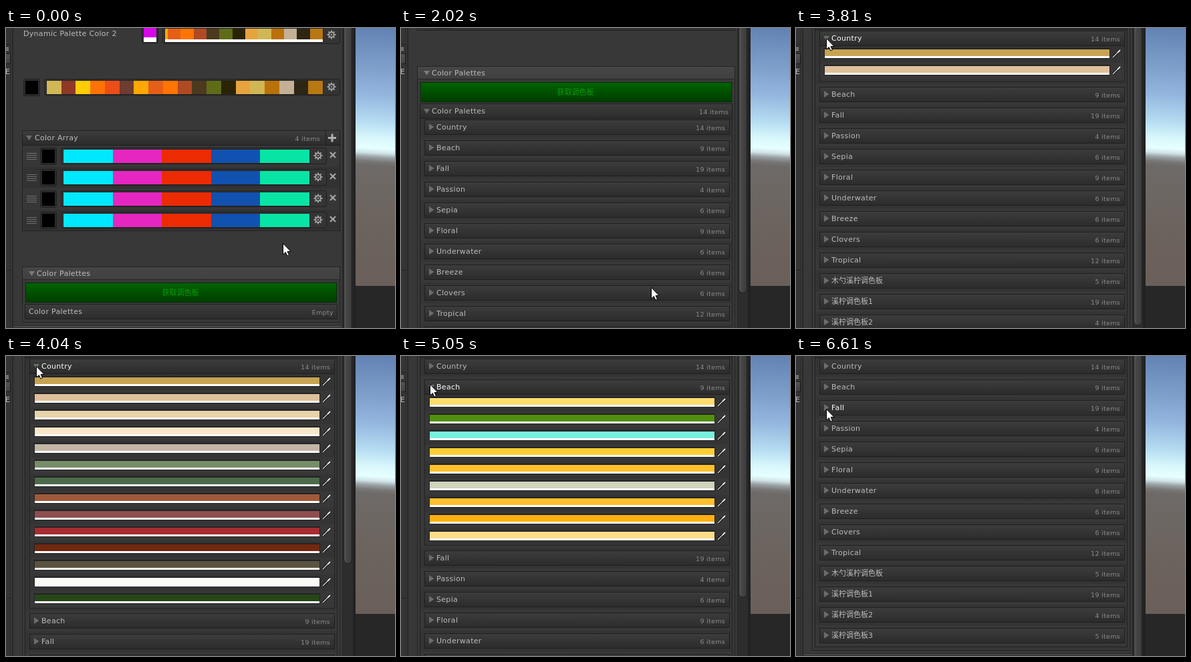
Write an HTML page with a canvas that moves like this. It is 582 by 449 pixels and loops after 7540 ms.

```html
<!DOCTYPE html>
<html lang="zh">
<head>
<meta charset="utf-8">
<style>
html, body { margin: 0; width: 582px; height: 449px; overflow: hidden; background: #383838; }
canvas { display: block; }
</style>
</head>
<body>
<canvas id="stage" width="582" height="449"></canvas>
<script>
const ctx = document.getElementById('stage').getContext('2d');
const LOOP = 7540, LIST_H = 433, ROW = 25;
const FONT = '"DejaVu Sans", "Noto Sans CJK SC", "Noto Sans CJK", sans-serif';
const colors = s => s.split(' ').map(c => '#' + c);

const autumn = colors('d0b856 8f3826 ffcd07 ff7204 ec4e18 6e3c31 ffa703 e55f16 ff7403 b04a23 4b3a1e 606b18 2a2405 e7a33e d1b753 bb710a c3b095 2e2614 b87812');
const bright = colors('00e8fd e626c0 ed2b03 1151b0 08e4a4');
const country = colors('c7a353 dfc09b e8d4a9 f8e7c8 c3b6a6 768d6a 4d6b4a a05a3a 8e4e4e a82c33 732810 5c5340 fbfbf6 274617');
const beach = colors('ffdd6d 51900c 78f0de ffcf33 ffc02c cdd5bb ffbf2c ffb010 ffdc88');

// Stepped timelines: [time, value...], each value holds until the next entry
const listKeys = [[0, 0], [1240, .6], [1320, 1]];
const scrollKeys = [[0, 0], [1720, 60], [1800, 120], [1870, 180], [1940, 240], [2020, 300], [2420, 375], [2490, 433]];
const pressKeys = [[0, 0], [1090, 1], [1240, 0]];
const cursorKeys = [[0, 415, 322], [300, 411, 352], [390, 408, 377], [540, 404, 381], [620, 397, 389],
  [700, 391, 395], [780, 388, 396], [1870, 381, 392], [2020, 375, 388], [2720, 366, 380], [2800, 354, 368], [2880, 347, 360]];
for (let i = 1; i <= 10; i++) {
  const p = i / 10, e = p * p * (3 - 2 * p);
  cursorKeys.push([3030 + (i - 1) * 77.7, 347 - 300 * e, 360 - 342 * e]);
}
cursorKeys.push([3810, 46, 15], [4590, 45, 24], [4670, 44, 35], [4740, 44, 42],
  [5580, 44, 50], [5630, 45, 58], [5680, 46, 63], [5840, 46, 72], [5920, 46, 79]);

const items = [
  { name: 'Country', n: 14, rows: country, keys: [[0, 0], [3810, .15], [3880, .5], [3960, .85], [4040, 1], [4360, .5], [4440, 0]] },
  { name: 'Beach', n: 9, rows: beach, keys: [[0, 0], [4820, .15], [4900, .5], [4970, .85], [5050, 1], [5370, .5], [5440, 0]] },
  { name: 'Fall', n: 19, rows: autumn, keys: [[0, 0], [6070, .5], [6150, 1], [6450, .6], [6530, .2], [6610, 0]] },
  { name: 'Passion', n: 4 }, { name: 'Sepia', n: 6 }, { name: 'Floral', n: 9 }, { name: 'Underwater', n: 6 },
  { name: 'Breeze', n: 6 }, { name: 'Clovers', n: 6 }, { name: 'Tropical', n: 12 },
  { name: '木勺溪柠调色板', n: 5 }, { name: '溪柠调色板1', n: 19 }, { name: '溪柠调色板2', n: 4 }, { name: '溪柠调色板3', n: 5 }
];

const at = (keys, t) => keys.findLast(k => k[0] <= t).slice(1);

function rect(x, y, w, h, fill) {
  ctx.fillStyle = fill;
  ctx.fillRect(x, y, w, h);
}
function shade(x, y, w, h, ...stops) {
  const g = ctx.createLinearGradient(0, y, 0, y + h);
  stops.forEach((c, i) => g.addColorStop(i / (stops.length - 1), c));
  rect(x, y, w, h, g);
}
function outline(x, y, w, h, color = '#242424') {
  ctx.strokeStyle = color;
  ctx.lineWidth = 1;
  ctx.strokeRect(x + .5, y + .5, w - 1, h - 1);
}
function text(s, x, y, color = '#bcbcbc', size = 11, align = 'left') {
  ctx.font = `${size}px ${FONT}`;
  ctx.letterSpacing = /[^\x00-\x7f]/.test(s) ? '0px' : '0.3px';
  ctx.textAlign = align;
  ctx.fillStyle = color;
  ctx.fillText(s, x, y + 4);
}
const note = (s, x, y) => text(s, x, y, '#8c8c8c', 9.5, 'right');

function shape(points, fill) {
  ctx.beginPath();
  points.forEach(p => ctx.lineTo(...p));
  ctx.closePath();
  ctx.fillStyle = fill;
  ctx.fill();
}
function triangle(x, y, down, color = '#6c6c6c') {
  shape(down ? [[x, y - 3], [x + 9, y - 3], [x + 4.5, y + 4]] : [[x + 1, y - 5], [x + 8.5, y], [x + 1, y + 5]], color);
}
function gear(x, y) {
  ctx.strokeStyle = '#a0a0a0';
  ctx.lineWidth = 2;
  ctx.beginPath();
  ctx.arc(x, y, 3.8, 0, 7);
  for (let a = 0; a < 8; a++) {
    const c = Math.cos(a * Math.PI / 4), s = Math.sin(a * Math.PI / 4);
    ctx.moveTo(x + c * 4, y + s * 4);
    ctx.lineTo(x + c * 6.5, y + s * 6.5);
  }
  ctx.stroke();
  rect(x - 1, y - 1, 2, 2, '#a0a0a0');
}
function frame(x, y, w, h, fill) {
  ctx.beginPath();
  ctx.roundRect(x + .5, y + .5, w - 1, h - 1, 2.5);
  ctx.fillStyle = fill;
  ctx.fill();
  ctx.strokeStyle = '#212121';
  ctx.lineWidth = 1;
  ctx.stroke();
}
function stripes(list, x, y, w, h) {
  list.forEach((c, i) => {
    const a = Math.round(x + i * w / list.length);
    rect(a, y, Math.round(x + (i + 1) * w / list.length) - a, h, c);
  });
}
function paletteField(x, barX, y, barW, right, list) {
  frame(x, y, 25, 26, '#2b2b2b');
  rect(x + 3, y + 3, 19, 20, '#000');
  frame(barX - 4, y, right - barX + 4, 25, '#343434');
  rect(barX - 1, y + 2, barW + 2, 22, '#252525');
  stripes(list, barX, y + 3, barW, 20);
  gear(right - 13, y + 12);
}
function header(x, y, w, h) {
  shade(x, y, w, h, '#3d3d3d', '#2b2b2b');
  outline(x, y, w, h, '#1f1f1f');
}
function strokes(color, width, ...lines) {
  ctx.strokeStyle = color;
  ctx.lineWidth = width;
  ctx.beginPath();
  for (const [a, b, c, d] of lines) { ctx.moveTo(a, b); ctx.lineTo(c, d); }
  ctx.stroke();
}
function dropper(x, y) {
  strokes('#161616', 3.6, [x + 1, y + 13, x + 12, y + 2]);
  strokes('#dcdcdc', 1.3, [x + 1, y + 13, x + 8, y + 6]);
  strokes('#f2f2f2', 2, [x + 8, y + 6, x + 12, y + 2]);
}

function topFields() {
  text('Dynamic Palette Color 2', 26, 8);
  frame(203, -3, 25, 26, '#2b2b2b');
  rect(206, -2, 19, 16, '#d707e8');
  rect(206, 14, 19, 7, '#fff');
  frame(234, -3, 266, 27, '#343434');
  rect(237, 0, 238, 22, '#252525');
  rect(238, 1, 4, 16, autumn[6]);
  stripes(autumn.slice(7), 242, 1, 232, 16);
  rect(238, 17, 236, 4, '#fff');
  gear(487, 10);
  paletteField(26, 61, 76, 413, 500, autumn);
}

function colorArray() {
  rect(24, 153, 476, 151, '#333');
  header(24, 153, 476, 23);
  triangle(30, 164, true);
  text('Color Array', 43, 164);
  note('4 items', 470, 165);
  rect(478, 154, 1, 21, '#1f1f1f');
  rect(482, 163, 12, 3, '#b0b0b0');
  rect(486.5, 158.5, 3, 12, '#b0b0b0');
  for (let i = 0; i < 4; i++) {
    const y = 176 + 32 * i;
    rect(25, y, 474, 32, i % 2 ? '#323232' : '#373737');
    for (let k = 0; k < 4; k++) rect(31, y + 11 + 3 * k, 15, 1, '#707070');
    paletteField(51, 86, y + 3, 368, 480, bright);
    strokes('#aaa', 2, [485, y + 10, 493, y + 18], [493, y + 10, 485, y + 18]);
  }
  outline(24, 153, 476, 151, '#222');
}

function itemRows(item, y, h) {
  ctx.save();
  ctx.beginPath();
  ctx.rect(35, y, 457, h + 1);
  ctx.clip();
  item.rows.forEach((c, i) => {
    const ry = y + i * ROW;
    rect(36, ry, 455, ROW, i % 2 ? '#383838' : '#343434');
    rect(42, ry + 3, 428, 16, '#242424');
    rect(43, ry + 5, 426, 11, c);
    rect(43, ry + 15, 426, 3, '#fff');
    dropper(473, ry + 4);
  });
  ctx.restore();
  outline(35, y - 1, 457, h + 2, '#242424');
}

function palettes(t, open, listH, scroll, mx, my) {
  rect(24, 357, 476, 84 + listH, '#383838');
  outline(24, 357, 476, 84 + listH);
  shade(25, 358, 474, 18, '#464646', '#404040');
  rect(25, 376, 474, 1, '#262626');
  triangle(34, 367, true, '#7a7a7a');
  text('Color Palettes', 46, 367);

  const down = at(pressKeys, t)[0];
  shade(29, 381, 466, 30, ...(down ? ['#003c00', '#005000'] : ['#006500', '#003c00']));
  outline(29, 381, 466, 30, '#052e05');
  text('获取调色板', 261, 396, '#0c9c0c', 11, 'center');

  if (open) {
    rect(28, 435, 468, listH + 1, '#343434');
    outline(28, 413, 468, 23 + listH, '#222');
  }
  header(28, 413, 468, 23);
  if (open) triangle(34, 424, true);
  text('Color Palettes', open ? 46 : 34, 424);
  note(open ? '14 items' : 'Empty', 490, 425);
  if (!open) return;

  ctx.save();
  ctx.beginPath();
  ctx.rect(28, 436, 468, listH - 1);
  ctx.clip();
  let y = 437;
  items.forEach((item, i) => {
    const body = item.h;
    rect(29, y - 4, 466, 31 + body, i % 2 ? '#383838' : '#343434');
    if (body) itemRows(item, y + 23, body);
    header(35, y, 457, 23);
    const hover = mx < 60 && my >= y - scroll && my < y - scroll + 23;
    triangle(41, y + 11, body > 0, body ? '#5f755c' : '#6c6c6c');
    text(item.name, 53, y + 11, hover ? '#fff' : undefined);
    note(`${item.n} items`, 485, y + 12);
    y += 31 + body;
  });
  ctx.restore();
}

function leftEdge() {
  rect(0, 0, 8, 449, '#353535');
  rect(0, 24, 7, 1, '#222');
  rect(0, 362, 7, 1, '#222');
  for (const y of [29, 31, 33]) rect(0, y, 4, 1, '#aaa');
  shade(0, 38, 7, 16, '#555', '#404040');
  outline(-1, 38, 8, 16, '#1f1f1f');
  text('E', -1, 65);
  rect(7, 0, 4, 449, '#272727');
  rect(8, 0, 1, 449, '#414141');
}

function scrollbar(bottom) {
  rect(503, 0, 20, 449, '#262626');
  rect(504, 0, 15, 449, '#2d2d2d');
  const g = ctx.createLinearGradient(505, 0, 518, 0);
  g.addColorStop(0, '#595959');
  g.addColorStop(.35, '#464646');
  g.addColorStop(1, '#3a3a3a');
  ctx.beginPath();
  ctx.roundRect(505.5, -20, 12, bottom + 20, 6);
  ctx.fillStyle = g;
  ctx.fill();
  ctx.strokeStyle = '#1e1e1e';
  ctx.lineWidth = 1;
  ctx.stroke();
  rect(519, 0, 4, 449, '#222');
}

function scene() {
  const sky = ctx.createLinearGradient(564, 0, 540, 386);
  [[0, '#6282b4'], [60, '#7f9fcb'], [100, '#93b6de'], [140, '#b5dcf2'], [165, '#d9f8fb'], [180, '#e6ffff'],
   [187, '#cfe3e8'], [193, '#9ba3a6'], [200, '#797776'], [206, '#6e6a68'], [300, '#6c635d'], [386, '#6a5f59']]
    .forEach(([y, c]) => sky.addColorStop(y / 386, c));
  rect(523, 0, 59, 386, sky);
  rect(523, 386, 59, 63, '#272727');
}

function cursor(x, y) {
  const arrow = [[0, 0], [0, 16.5], [3.8, 13], [6.4, 18.6], [9, 17.4], [6.5, 12], [11.5, 12]].map(([a, b]) => [x + a - .5, y + b + .5]);
  shape(arrow, '#fff');
  ctx.strokeStyle = '#000';
  ctx.lineWidth = 1;
  ctx.stroke();
}

function draw() {
  const t = performance.now() % LOOP;
  const [open] = at(listKeys, t), [scroll] = at(scrollKeys, t), [mx, my] = at(cursorKeys, t).map(Math.round);
  let extra = 0;
  for (const item of items) {
    item.h = item.rows ? Math.round(item.n * ROW * at(item.keys, t)[0]) : 0;
    extra += item.h;
  }
  const listH = Math.round(LIST_H * open) + extra;

  rect(0, 0, 582, 449, '#383838');
  ctx.save();
  ctx.translate(0, -scroll);
  topFields();
  colorArray();
  palettes(t, open, listH, scroll, mx, my);
  rect(11, 445 + listH, 492, 1, '#252525');
  rect(11, 446 + listH, 492, 1, '#585858');
  ctx.restore();

  leftEdge();
  scrollbar(475 - 813 * (listH - scroll) / (947 + listH));
  scene();
  cursor(mx, my);
  requestAnimationFrame(draw);
}
draw();
</script>
</body>
</html>
```
